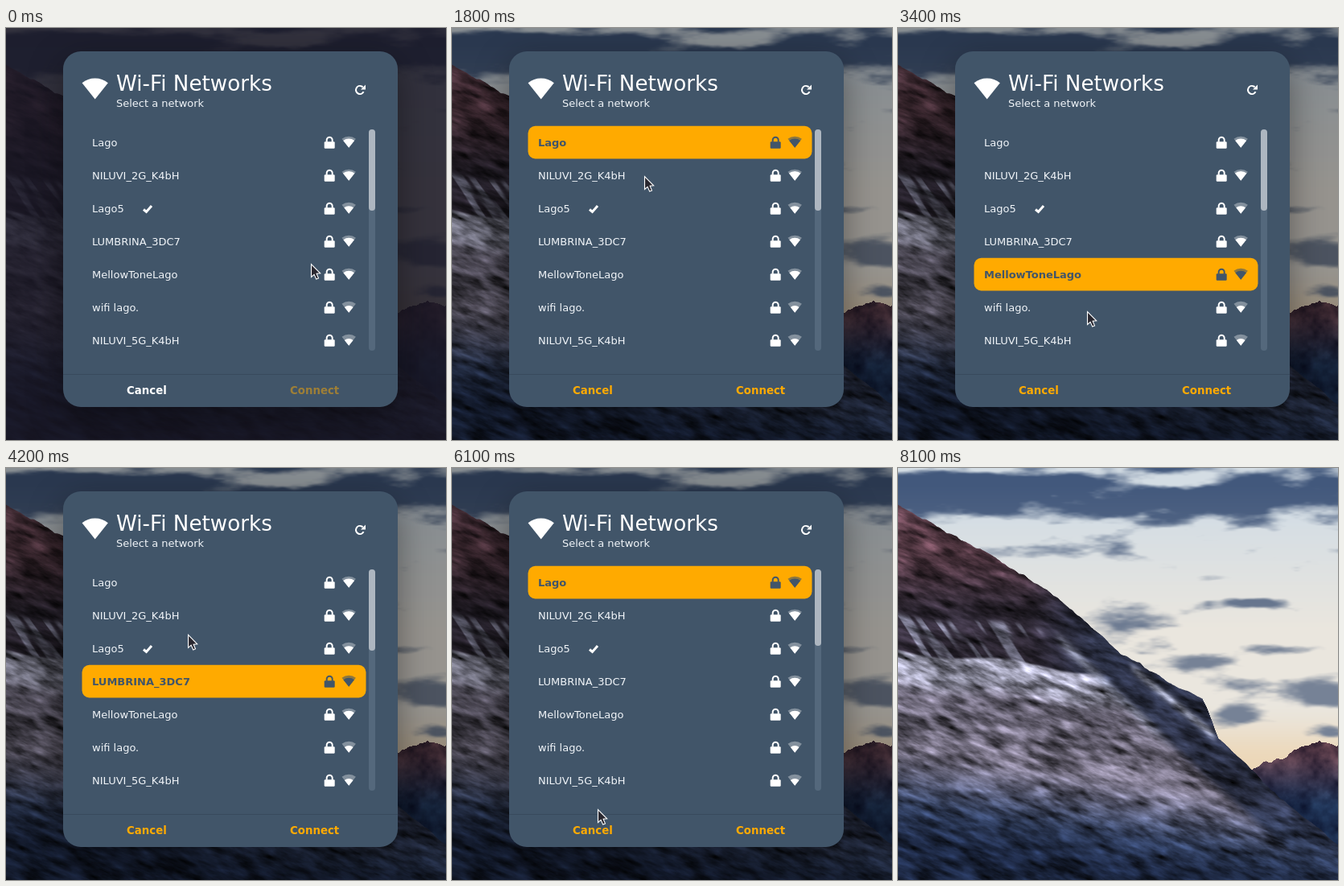
Animation, 547 px wide and 512 px high, one loop 8400 ms. Source, as an HTML page with a canvas:

```html
<!DOCTYPE html>
<html lang="en">
<head>
<meta charset="utf-8">
<title>Wi-Fi Networks</title>
<style>
html, body { margin: 0; width: 100%; height: 100%; overflow: hidden; background: #222; }
canvas { display: block; }
</style>
</head>
<body>
<canvas id="stage" width="547" height="512"></canvas>
<script>
const W = 547, H = 512, LOOP = 8400, TICK = 100;
const SLATE = [65, 85, 105], WHITE = [255, 255, 255], ORANGE = [255, 170, 0], GOLD = [158, 127, 55];
const FONT = '"DejaVu Sans", sans-serif';
const ROW_TOP = 122, ROW_STEP = 41, FADE = 220;

const stage = document.getElementById('stage').getContext('2d');
const layer = makeCanvas();
const wallpaper = makeCanvas();

// Label and signal strength of each network
const networks = [
  ['Lago', .8], ['NILUVI_2G_K4bH', .84], ['Lago5', .68], ['LUMBRINA_3DC7', .78],
  ['MellowToneLago', .78], ['wifi lago.', .62], ['NILUVI_5G_K4bH', .62]
];
const JOINED = 2;

// Time, x and y of the pointer where it turns or rests
const path = [
  [0, 379, 293], [100, 533, 266], [400, 430, 67], [600, 296, 180], [900, 280, 119],
  [1000, 266, 154], [1300, 242, 126], [1800, 239, 184], [2600, 236, 230], [3400, 235, 352],
  [4400, 225, 190], [5000, 220, 134], [6100, 181, 424], [7000, 181, 424], [7500, 187, 458],
  [8000, 190, 520]
];
const clicks = [1450, 2050, 2450, 2850, 3150, 3550, 3750, 3950, 4350, 4750];

function makeCanvas() {
  const c = document.createElement('canvas');
  c.width = W;
  c.height = H;
  return c.getContext('2d');
}

const clamp = v => Math.max(0, Math.min(1, v));
const ramp = (from, to, v) => clamp((v - from) / (to - from));
const smooth = (from, to, v) => {
  const u = ramp(from, to, v);
  return u * u * (3 - 2 * u);
};
const bell = v => Math.exp(-v * v);
const mix = (a, b, p) => [a[0] + (b[0] - a[0]) * p, a[1] + (b[1] - a[1]) * p, a[2] + (b[2] - a[2]) * p];
const rgb = (c, a = 1) => `rgba(${c.map(Math.round).join()},${a})`;

// ---- Wallpaper ----

function hash(x, y) {
  let h = Math.imul(x, 374761393) + Math.imul(y, 668265263);
  h = Math.imul(h ^ (h >>> 13), 1274126177);
  return ((h ^ (h >>> 16)) >>> 0) / 2 ** 32;
}

function noise(x, y) {
  const i = Math.floor(x), j = Math.floor(y);
  const u = smooth(0, 1, x - i), v = smooth(0, 1, y - j);
  const top = hash(i, j) * (1 - u) + hash(i + 1, j) * u;
  const low = hash(i, j + 1) * (1 - u) + hash(i + 1, j + 1) * u;
  return top + (low - top) * v;
}

// Layered noise, centred on zero
function grain(x, y) {
  let sum = 0;
  for (let k = 0, size = 1; k < 4; k++, size /= 2) sum += (noise(x / size, y / size) - .5) * size;
  return sum / 1.9;
}

// Centre and radii of the main clouds
const clouds = [
  [190, 102, 75, 14], [283, 187, 70, 24], [440, 167, 40, 7], [487, 225, 50, 8],
  [360, 240, 70, 12], [420, 268, 65, 14], [516, 279, 42, 21], [418, 308, 34, 20], [540, 327, 26, 9]
];
const ridge = [[0, 46], [100, 100], [185, 150], [280, 232], [350, 273], [378, 285], [398, 334], [475, 410], [547, 468]];

function ridgeAt(x) {
  const i = ridge.findIndex(p => p[0] > x);
  const [a, b] = [ridge[i - 1], ridge[i] || ridge[i - 1]];
  return a[1] + (b[1] - a[1]) * ramp(a[0], b[0], x);
}

function skyColor(x, y) {
  const air = mix(mix([212, 221, 228], [234, 230, 222], ramp(60, 200, y)), [236, 215, 184], smooth(290, 370, y));
  let cover = .95 * bell((y - 32) / 38) - .5 * bell((x - 350) / 70) * bell((y - 16) / 12);
  for (const [cx, cy, rx, ry] of clouds) cover += .75 * bell((x - cx) / rx) * bell((y - cy) / ry);
  cover += grain(x / 55, y / 17) * 1.1;
  const cloud = mix([66, 88, 124], [118, 130, 150], ramp(20, 230, y));
  return mix(air, cloud, smooth(.2, .75, cover));
}

function farColor(x, y) {
  const c = mix([104, 70, 82], [34, 56, 92], smooth(345, 425, y));
  return mix(c, [0, 0, 20], .2 + grain(x / 14, y / 14));
}

function rockColor(x, y, top) {
  const snowline = 224 + x * .11 + 4 * Math.sin(x / 28);
  const below = y - snowline;
  const edge = 250 + (y - 265) * 1.1;
  const rough = grain((x + y * .4) / 26, (y - x * .4) / 8);

  let c = mix([86, 58, 69], [46, 40, 52], smooth(90, 190, y));
  c = mix(c, [42, 47, 67], smooth(150, 260, x));
  const gully = smooth(-48, -38, below) * smooth(.4, .75, noise((x - y * .7) / 7, y / 60));
  c = mix(c, [124, 125, 146], gully * .8 * (1 - smooth(165, 185, x)));
  const ice = mix([152, 152, 172], [108, 103, 120], smooth(28, 55, below));
  c = mix(c, ice, smooth(0, 4, below) * (1 - smooth(edge - 8, edge + 14, x)));

  const chute = bell((y - 208 - (x - 195) * .95) / 8) * smooth(190, 210, x) * (1 - smooth(300, 350, x));
  const rim = bell((y - 242 - (x - 283) * .82) / 6) * smooth(283, 300, x) * (1 - smooth(385, 398, x));
  c = mix(c, [142, 146, 166], Math.max(chute * .65, rim * .9));

  c = mix(c, [48, 61, 91], smooth(0, 90, y - 340 - x * .14));
  c = mix(c, [23, 33, 57], smooth(0, 70, y - 400 - x * .13) * .85);
  const light = 1 + rough * 2;
  return c.map(v => v * light);
}

function paintWallpaper(g) {
  const image = g.createImageData(W, H);
  for (let x = 0; x < W; x++) {
    const top = ridgeAt(x) + grain(x / 12, 3) * 5;
    const away = x - 514;
    const far = 341 + away * (away < 0 ? -.45 : .08) + grain(x / 16, 9) * 14;
    for (let y = 0; y < H; y++) {
      const near = clamp(y - top + .5);
      let c = [0, 0, 0];
      if (near < 1) c = x > 430 && y > far ? farColor(x, y) : skyColor(x, y);
      if (near > 0) c = mix(c, rockColor(x, y), near);
      image.data.set([...c, 255], (y * W + x) * 4);
    }
  }
  g.putImageData(image, 0, 0);
}

// ---- Motion ----

function pointerAt(t) {
  const i = path.findIndex(k => k[0] > t);
  if (i < 0) return path.at(-1).slice(1);
  const a = path[i - 1], b = path[i];
  return mix(a, b, smooth(a[0], b[0], t)).slice(1);
}

const rowUnder = time => time === undefined ? -1 : Math.floor((pointerAt(time)[1] - ROW_TOP) / ROW_STEP);

function selection(t) {
  const i = clicks.findLastIndex(time => time <= t);
  const p = i < 0 ? 1 : 1 - (1 - ramp(0, FADE, t - clicks[i])) ** 2;
  return { row: rowUnder(clicks[i]), last: rowUnder(clicks[i - 1]), p };
}

// ---- Dialog ----

function trace(g, pts) {
  g.beginPath();
  pts.forEach(([x, y]) => g.lineTo(x, y));
}

function fillRound(g, color, x, y, w, h, r) {
  g.fillStyle = color;
  g.beginPath();
  g.roundRect(x, y, w, h, r);
  g.fill();
}

function text(g, str, x, y, size, color, bold) {
  g.font = `${bold ? 'bold ' : ''}${size}px ${FONT}`;
  g.fillStyle = color;
  g.fillText(str, x, y);
}

function wedge(g, x, y, r, color) {
  const half = .67;
  g.fillStyle = color;
  g.beginPath();
  g.moveTo(x, y);
  g.arc(x, y, r, -Math.PI / 2 - half, -Math.PI / 2 + half);
  g.fill();
}

function lock(g, x, y, color) {
  fillRound(g, color, x, y + 6.5, 13, 8.5, 1.2);
  g.strokeStyle = color;
  g.lineWidth = 2;
  g.beginPath();
  g.moveTo(x + 3, y + 7);
  g.arc(x + 6.5, y + 4.5, 3.5, Math.PI, 0);
  g.lineTo(x + 10, y + 7);
  g.stroke();
}

function check(g, x, y, color) {
  g.strokeStyle = color;
  g.lineWidth = 3;
  trace(g, [[x + 1, y + 1], [x + 4.5, y + 4], [x + 11, y - 3.5]]);
  g.stroke();
}

function refresh(g) {
  g.strokeStyle = g.fillStyle = '#fff';
  g.lineWidth = 2;
  g.beginPath();
  g.arc(440, 77, 5, .45, 5.5);
  g.stroke();
  trace(g, [[447, 70.5], [447, 76.5], [441, 76.5]]);
  g.fill();
}

function drawRow(g, i, lit) {
  const [name, strength] = networks[i];
  const y = ROW_TOP + i * ROW_STEP, bold = lit > .5;
  if (lit) fillRound(g, rgb(ORANGE, lit), 94.5, y - .2, 353, 40.7, 9);
  const ink = mix(WHITE, SLATE, lit);
  text(g, name, 107, y + 25, 13, rgb(mix([240, 244, 248], SLATE, lit)), bold);
  if (i === JOINED) check(g, bold ? 175 : 170, y + 20.5, rgb(ink));
  lock(g, 395.7, y + 12.7, rgb(ink));
  wedge(g, 426.2, y + 26.7, 14, rgb(ink, .35 + .25 * lit));
  wedge(g, 426.2, y + 26.7, 14 * strength, rgb(ink));
}

function drawDialog(g, t) {
  g.clearRect(0, 0, W, H);
  g.save();
  g.shadowColor = 'rgba(0,0,0,.4)';
  g.shadowBlur = 44;
  g.shadowOffsetY = 14;
  fillRound(g, rgb(SLATE), 71, 29, 416, 442, 22);
  g.restore();

  wedge(g, 110.7, 88.6, 26, '#fff');
  text(g, 'Wi-Fi Networks', 137, 78, 26.2, '#fff');
  text(g, 'Select a network', 137, 98, 13, '#f0f4f8');
  refresh(g);

  const { row, last, p } = selection(t);
  networks.forEach((_, i) => drawRow(g, i, i === row ? p : i === last ? 1 - p : 0));

  fillRound(g, '#54687c', 451, 126, 8, 275, 4);
  fillRound(g, '#adb6c0', 451, 126, 8, 101 - 6 * ramp(5500, 6000, t), 4);

  const hover = ramp(7300, 7500, t);
  if (hover) fillRound(g, `rgba(84,82,76,${hover})`, 71, 430, 208, 41, [0, 0, 0, 22]);
  g.fillStyle = '#384a5d';
  g.fillRect(71, 430, 416, 1);

  const enabled = i => i >= 0 && i !== JOINED ? 1 : 0;
  const active = enabled(last) * (1 - p) + enabled(row) * p;
  text(g, 'Cancel', 150, 455, 13.33, rgb(mix(t ? ORANGE : WHITE, SLATE, hover)), true);
  text(g, 'Connect', 353, 455, 13.33, rgb(mix(GOLD, ORANGE, active)), true);
}

function drawPointer(g, x, y) {
  g.save();
  g.translate(x + .5, y + .5);
  trace(g, [[0, 0], [0, 16], [3.6, 12.8], [6.2, 18.6], [9, 17.4], [6.6, 11.8], [11.2, 11.4]]);
  g.closePath();
  g.fillStyle = '#29272f';
  g.fill();
  g.strokeStyle = '#fff';
  g.lineWidth = 1.1;
  g.stroke();
  g.restore();
}

function frame(now) {
  const t = Math.floor((now % LOOP) / TICK) * TICK;
  stage.drawImage(wallpaper.canvas, 0, 0);
  const dim = .36 * (1 - ramp(7500, 7800, t));
  stage.fillStyle = t ? `rgba(0,0,0,${dim})` : 'rgba(24,22,34,.86)';
  stage.fillRect(0, 0, W, H);

  const shown = 1 - ramp(7500, 8100, t);
  if (shown) {
    drawDialog(layer, t);
    stage.globalAlpha = shown;
    stage.drawImage(layer.canvas, 0, 0);
    stage.globalAlpha = 1;
    drawPointer(stage, ...pointerAt(t));
  }
  requestAnimationFrame(() => frame(performance.now() - start));
}

paintWallpaper(wallpaper);
const start = performance.now();
frame(0);
</script>
</body>
</html>
```
